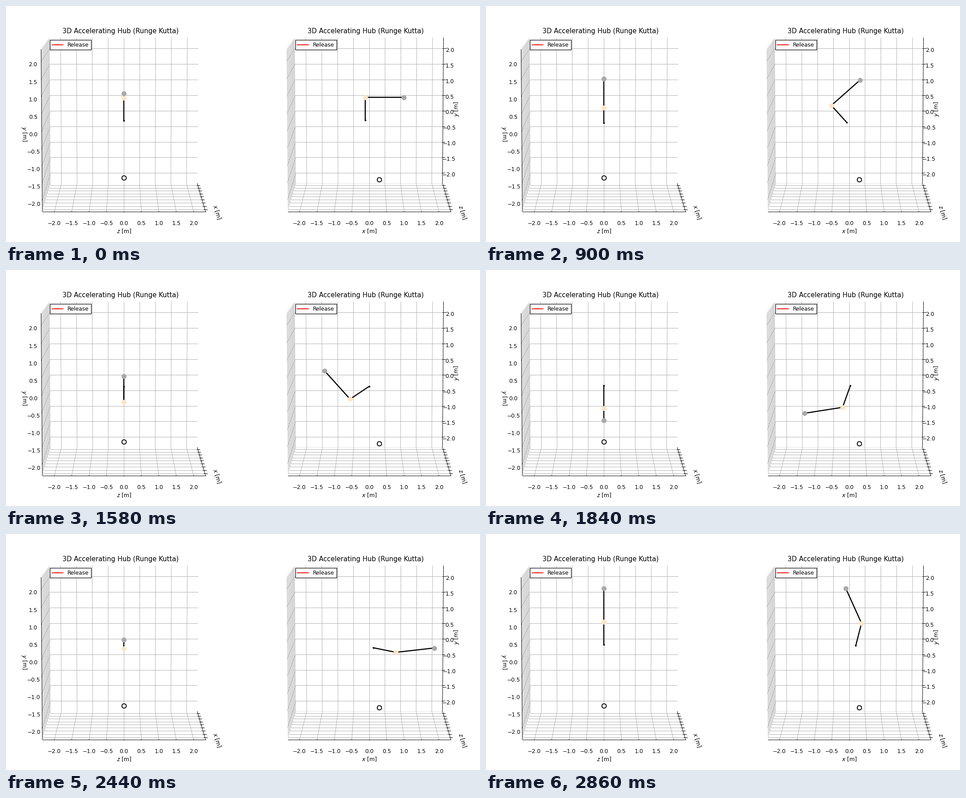
Write a matplotlib script that moves like this. It is 1058 px wide and 529 px high and loops after 2.88 s.

```python
import numpy as np
import matplotlib.pyplot as plt
from matplotlib.animation import FuncAnimation
from matplotlib.patches import Rectangle

W, H = 1058, 529
FRAMES, STEP = 144, 20
ELEV = np.radians(7.5)
COS, SIN = np.cos(ELEV), np.sin(ELEV)
HALF = 2.25 * 25 / 24          # half width of the 3D box
UNIT = 0.55 / HALF
FOCUS, DIST, MID_Y = 3156, 10, 256.6
LEFT, RIGHT = 263.3, 810.8     # horizontal centre of each panel
TICKS = np.arange(-2, 2.1, 0.5)
GRID = "#b0b0b0"
L1, L2 = 0.70, 1.16
RELEASE = 1.26

fig = plt.figure(figsize=(12, 6), dpi=W / 12, facecolor="white")
ax = fig.add_axes([0, 0, 1, 1])
ax.set_xlim(0, W)
ax.set_ylim(H, 0)
ax.axis("off")


def project(cx, u, v, t):
    """Box coordinates (right, up, toward the viewer) to pixels."""
    u, v, t = (UNIT * np.asarray(a, float) for a in (u, v, t))
    scale = FOCUS / (DIST - t * COS - v * SIN)
    return cx + u * scale, MID_Y - (v * COS - t * SIN) * scale


def line(cx, a, b, color="black", lw=0.8, z=1):
    x, y = project(cx, *zip(a, b))
    ax.plot(x, y, color=color, lw=lw, zorder=z, solid_capstyle="butt")


def label(x, y, s, size=10, ha="center"):
    ax.text(x, y + 0.0365 * 10 * size * W / 12 / 72, s, size=size, ha=ha,
            va="baseline", zorder=6)


def name(x, y, letter, angle):
    ax.text(x, y, f"${letter}$ [m]", size=10, rotation=angle,
            ha="center", va="center", zorder=6)


def number(v):
    return f"{v:.1f}".replace("-", "\u2212")


def draw_panel(cx, h=HALF):
    for k in TICKS:
        line(cx, (k, h, -h), (k, -h, -h), GRID)
        line(cx, (k, -h, -h), (k, -h, h), GRID)
        line(cx, (-h, k, h), (-h, k, -h), GRID)
        line(cx, (-h, k, -h), (h, k, -h), GRID)
        line(cx, (-h, h, k), (-h, -h, k), GRID)
        line(cx, (-h, -h, k), (h, -h, k), GRID)
        # ticks of the bottom and depth axes
        line(cx, (k, -h, h - 0.075), (k, -h, h + 0.0375), z=2)
        line(cx, (h - 0.0375, -h, k), (h + 0.075, -h, k), z=2)
        label(cx + 78 * k, 487, number(k))
    line(cx, (-h, -h, h), (h, -h, h), z=2)
    line(cx, (h, -h, -h), (h, -h, h), z=2)

    # title and legend
    x0 = cx - 165.3
    ax.text(cx - 7.8, 61.5, "3D Accelerating Hub (Runge Kutta)", size=12,
            ha="center", va="baseline")
    ax.add_patch(Rectangle((x0, 76), 92, 22, fc="white", ec="black",
                           lw=1, zorder=5))
    ax.plot([x0 + 4.5, x0 + 29.3], [86.5, 86.5], color="red", lw=1.5, zorder=6)
    label(x0 + 39, 86.5, "Release", ha="left")


draw_panel(LEFT)
draw_panel(RIGHT)
h = HALF
line(LEFT, (-h, h, h), (-h, -h, h), z=2)
line(RIGHT, (h, h, -h), (h, -h, -h), z=2)
line(RIGHT, (-h, -h, -h), (h, -h, -h), "#e8e8e8", z=0.5)
for n, k in enumerate(TICKS[::-1]):
    line(LEFT, (-h, k, h - 0.075), (-h, k, h + 0.0375), z=2)
    line(RIGHT, (h - 0.0375, k, -h), (h + 0.075, k, -h), z=2)
    label(60.2 + 0.27 * n, 131 + 39.05 * n, number(k))
    label(990.8 - 0.27 * n, 98.8 + 34.8 * n, number(k))
name(263.5, 505, "z", 0)
name(811, 505, "x", 0)
name(40.5, 286.5, "y", -90)
name(1005.5, 231, "y", 90)
name(471.5, 462.5, "x", -73)
name(1019, 462.5, "z", -73)

# Hub path through a few timed points
KNOTS = [0, 0.52, 1.26, 1.58, 2.08, 2.44, 2.86]
HUB_X = np.polyfit(KNOTS, [-0.12, -0.105, -0.03, -0.003, 0.062, 0.122, 0.196], 4)
HUB_Y = np.polyfit(KNOTS, [0.005, -0.046, -0.067, -0.053, -0.019, 0.022, 0.09], 4)


def joints(time):
    """Hub, elbow and tip in the x-y plane."""
    s = time - RELEASE
    if s <= 0:
        upper = 90 + 51.55 * time ** 2
        swing = 0
    else:
        upper = 171.9 + 130 * s + 2 * s ** 2 + 12.4 * s ** 3
        swing = s ** 2 * np.polyval([12.2, -93, 121.8, 43.35], s)
    a, b = np.radians([upper, upper - 90 + swing])
    hub = np.array([np.polyval(HUB_X, time), np.polyval(HUB_Y, time)])
    elbow = hub + L1 * np.array([np.cos(a), np.sin(a)])
    tip = elbow + L2 * np.array([np.cos(b), np.sin(b)])
    return np.array([hub, elbow, tip]).T


def place(cx, x, y):
    """The left panel looks along x, the right one along z."""
    zero = np.zeros_like(x)
    return project(cx, zero, y, -x) if cx == LEFT else project(cx, x, y, zero)


def make_arm(cx):
    rx, ry = place(cx, np.array([0.3]), np.array([-1.81]))
    ax.plot(rx, ry, "o", ms=8, mfc="white", mec="black", mew=1.5, zorder=3)
    rod, = ax.plot([], [], lw=2, zorder=4, solid_joinstyle="round")
    dots = [ax.plot([], [], "o", ms=ms, mew=1, zorder=4 + 0.1 * n)[0]
            for n, ms in enumerate((2, 8, 8), 1)]
    return cx, rod, dots


arms = [make_arm(LEFT), make_arm(RIGHT)]


def update(i):
    time = i * STEP / 1000
    x, y = joints(time)
    colors = ["black", "black", "bisque", "darkgray"]
    if i == round(RELEASE * 1000 / STEP):
        colors = ["red"] * 4
    artists = []
    for cx, rod, dots in arms:
        px, py = place(cx, x, y)
        rod.set_data(px, py)
        for n, dot in enumerate(dots):
            dot.set_data([px[n]], [py[n]])
        for artist, color in zip([rod] + dots, colors):
            artist.set_color(color)
            artists.append(artist)
    return artists


anim = FuncAnimation(fig, update, frames=FRAMES, interval=STEP,
                     repeat=True, repeat_delay=0, blit=False)
plt.show()
```
